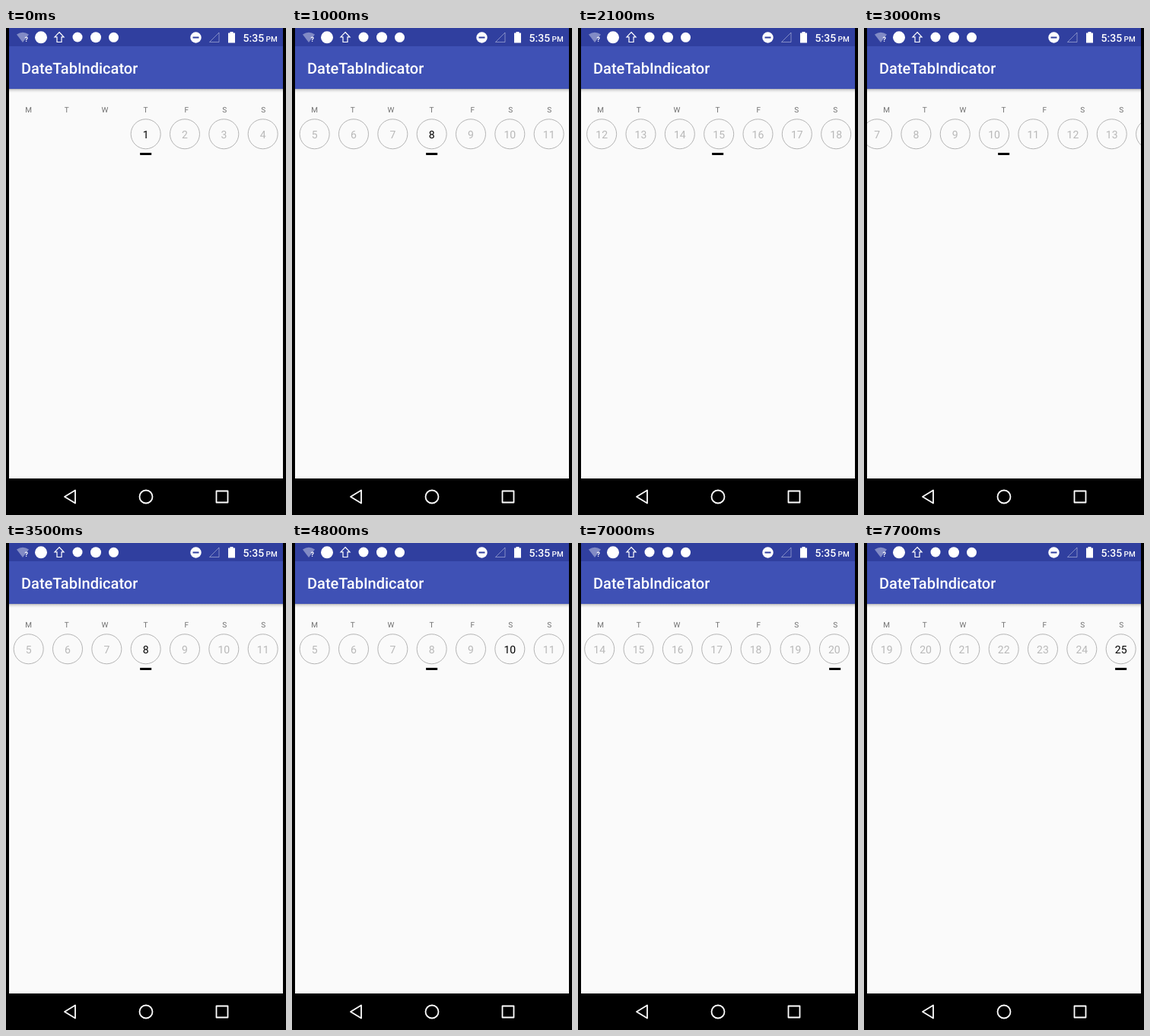
An HTML page that plays this animation: 368x640 px, repeating every 8 s.

```html
<!DOCTYPE html>
<html lang="en">
<head>
<meta charset="utf-8">
<title>DateTabIndicator</title>
<style>
  html, body { margin: 0; width: 100%; height: 100%; overflow: hidden; background: #000; }
  svg { display: block; width: 368px; height: 640px; }
  text { font-family: Roboto, sans-serif; text-rendering: geometricPrecision; }
  .mid { text-anchor: middle; }
  .weekday { font-size: 10px; fill: #707070; }
  .day { font-size: 14px; fill: #b8b8b8; }
  .day.on { fill: #000; }
  .ring { fill: none; stroke: #b4b4b4; }
  .nav { fill: none; stroke: #fff; stroke-width: 1.8; stroke-linejoin: round; }
</style>
</head>
<body>
<svg viewBox="0 0 368 640">
  <defs>
    <clipPath id="screen"><rect x="4" y="0" width="360" height="592"/></clipPath>
    <linearGradient id="shade" x2="0" y2="1">
      <stop offset="0" stop-color="#000" stop-opacity=".28"/>
      <stop offset=".4" stop-color="#000" stop-opacity=".1"/>
      <stop offset="1" stop-color="#000" stop-opacity="0"/>
    </linearGradient>
  </defs>
  <rect width="368" height="640"/>
  <rect x="4" width="360" height="592" fill="#fafafa"/>
  <rect x="4" y="80" width="360" height="5" fill="url(#shade)"/>
  <rect x="4" y="24" width="360" height="56" fill="#3f51b5"/>
  <rect x="4" width="360" height="24" fill="#303f9f"/>
  <text x="20" y="60" font-size="20" font-weight="500" fill="#fff">DateTabIndicator</text>

  <!-- status bar -->
  <g fill="#fff">
    <path d="M14 8.5Q22 3 30 8.5L22 19Z" opacity=".4"/>
    <text x="24.5" y="18" font-size="9" font-weight="700">?</text>
    <circle cx="46" cy="12.3" r="8"/>
    <path d="M70 5.5L76 11.8H73V18.5H67V11.8H64Z" fill="none" stroke="#fff" stroke-width="1.2"/>
    <circle cx="94" cy="12" r="6.5"/>
    <circle cx="118" cy="12.3" r="7"/>
    <circle cx="141.5" cy="12.3" r="6.5"/>
    <circle cx="249.5" cy="12.5" r="7.2"/>
    <rect x="245.5" y="11.5" width="8" height="2" fill="#303f9f"/>
    <path d="M280 6V18.5H267.5Z" fill="none" stroke="#fff" opacity=".4"/>
    <path d="M292 6.5H294.5V5H298.500V6.500H301V19.500H292Z"/>
    <text x="311.500" y="18" font-size="14" font-weight="500">5:35</text>
    <text x="341.500" y="18" font-size="10" font-weight="500">PM</text>
  </g>

  <g id="weekdays"></g>
  <g clip-path="url(#screen)"><g id="pager"></g></g>
  <rect id="bar" y="164" width="15" height="3"/>

  <!-- navigation bar -->
  <path class="nav" d="M77 616L91 607.500V624.500Z"/>
  <circle class="nav" cx="184" cy="616" r="8.500"/>
  <rect class="nav" x="276.500" y="608.500" width="15" height="15"/>
</svg>
<script>
const LOOP = 8000, STEP = 100, PAGE = 360, LAST_DAY = 25;
const pager = document.getElementById('pager');
const bar = document.getElementById('bar');
const weekdays = document.getElementById('weekdays');

// [start, duration, from page, to page]
const swipes = [
  [420, 500, 0, 1], [1767, 500, 1, 2], [2890, 540, 2, 1],
  [6330, 350, 1, 2], [6967, 500, 2, 3]
];
// [time, selected day]
const picks = [[0, 1], [1000, 8], [2400, 15], [3500, 8], [4800, 10], [5700, 11], [7700, 25]];
// [start, duration, from column, to column]
const barMoves = [[4800, 300, 3, 5], [5700, 300, 5, 6]];

const columnX = k => 29.67 + 51.33 * k;
const fling = u => u > 0.75 ? 1 : 1 - (1 - u) ** 5;
const smooth = u => (1 - Math.cos(Math.PI * u)) / 2;

function add(parent, tag, attrs, label = '') {
  const node = document.createElementNS('http://www.w3.org/2000/svg', tag);
  for (const name in attrs) node.setAttribute(name, attrs[name]);
  node.textContent = label;
  parent.append(node);
  return node;
}

function track(moves, ease, t) {
  let value = moves[0][2];
  for (const [start, duration, from, to] of moves) {
    if (t >= start) value = from + (to - from) * ease(Math.min(1, (t - start) / duration));
  }
  return value;
}

[29.5, 79.7, 130, 183.5, 237.3, 287.3, 338.3].forEach((x, i) =>
  add(weekdays, 'text', { class: 'weekday mid', x, y: 111 }, 'MTWTFSS'[i]));

const days = [];
for (let n = 1; n <= LAST_DAY; n++) {
  const slot = n + 2;
  const x = Math.floor(slot / 7) * PAGE + columnX(slot % 7);
  add(pager, 'circle', { class: 'ring', cx: x, cy: 139.3, r: 19.5 });
  days[n] = add(pager, 'text', { class: 'day mid', x, y: 144.6 }, n);
}

function draw(time) {
  const t = Math.floor(time % LOOP / STEP) * STEP;
  const selected = picks.filter(([at]) => t >= at).pop()[1];
  days.forEach((node, n) => node.classList.toggle('on', n === selected));
  pager.setAttribute('transform', `translate(${-PAGE * track(swipes, fling, t)})`);
  bar.setAttribute('x', columnX(track(barMoves, smooth, t)) - 7.5);
}

const begin = performance.now();
function tick() {
  draw(performance.now() - begin);
  requestAnimationFrame(tick);
}
tick();
</script>
</body>
</html>
```
